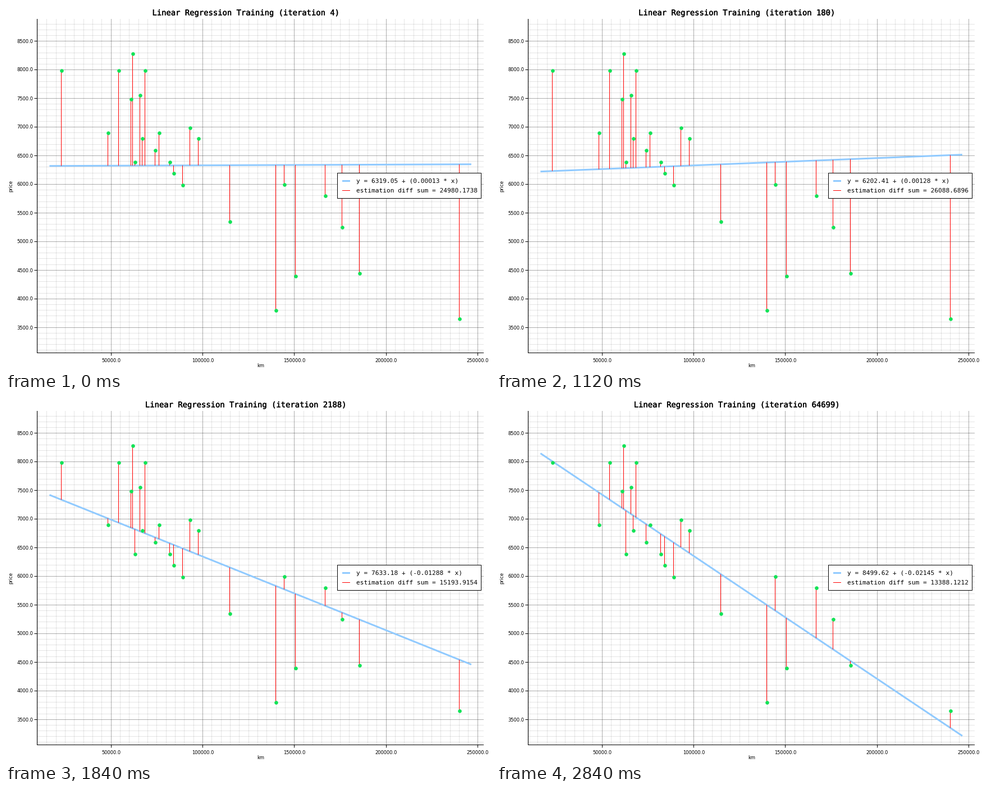
These frames come from a looping animation (864 by 648 pixels, 2880 ms). A matplotlib script:

```python
import math

import matplotlib
matplotlib.rcParams["toolbar"] = "None"
import matplotlib.pyplot as plt
import numpy as np
from matplotlib.animation import FuncAnimation
from matplotlib.collections import LineCollection
from matplotlib.patches import Rectangle
from matplotlib.patheffects import withStroke

W, H, DPI = 864, 648, 72
FRAMES, STEP_MS = 72, 40
RED, BLUE, GREEN = "#ff0000", "#90caff", "#12e356"
MONO, SANS = "DejaVu Sans Mono", "DejaVu Sans"
LEFT, RIGHT, TOP, BOTTOM = 55.5, 851, 23, 617.5

# The data set: one (km, price) pair for each car.
CARS = [(240000, 3650), (139800, 3800), (150500, 4400), (185530, 4450),
        (176000, 5250), (114800, 5350), (166800, 5800), (89000, 5990),
        (144500, 5999), (84000, 6200), (82029, 6390), (63060, 6390),
        (74000, 6600), (97500, 6800), (67000, 6800), (76025, 6900),
        (48235, 6900), (93000, 6990), (60949, 7490), (65674, 7555),
        (54000, 7990), (68500, 7990), (22899, 7990), (61789, 8290)]
KM, PRICE = np.array(CARS, float).T
KM_SPAN, PRICE_SPAN = np.ptp(KM), np.ptp(PRICE)
KM_PIVOT = 101067.22

# Gradient descent on min-max scaled data, starting from zero weights.
RATE = 0.01
u = (KM - KM.min()) / KM_SPAN
v = (PRICE - PRICE.min()) / PRICE_SPAN
A = np.column_stack([np.ones_like(u), u])
HESS = A.T @ A / len(u)
BEST = np.linalg.solve(HESS, A.T @ v / len(u))


def iteration(k):
    """Steady pace at first, then geometric growth."""
    grown = math.exp(1.489957 + 0.1350439 * k) - 0.8 - 0.51 * k
    return round(max(1.2 * k, grown))


def fit(n):
    decay = np.linalg.matrix_power(np.eye(2) - RATE * HESS, n)
    weights = BEST - decay @ BEST
    slope = weights[1] * PRICE_SPAN / KM_SPAN
    return PRICE.mean() - slope * KM_PIVOT, slope


def px(km):
    return 187.2 + (km - 50000) * 0.0032655


def py(price):
    return 62.7 + (8500 - price) * 0.1019


def mid(value):
    """Centre of the pixel that holds the value."""
    return np.floor(value) + 0.5


fig = plt.figure(figsize=(W / DPI, H / DPI), dpi=DPI, facecolor="white")
ax = fig.add_axes([0, 0, 1, 1])
ax.set_xlim(0, W)
ax.set_ylim(H, 0)
ax.axis("off")


def rule(x0, y0, x1, y1, color="black", width=1, z=1, alpha=1):
    ax.plot([x0, x1], [y0, y1], color=color, lw=width, zorder=z, alpha=alpha,
            solid_capstyle="butt", snap=False)


def label(x, y, text, size=8.4, font=SANS, **kw):
    kw.setdefault("va", "center_baseline")
    return ax.text(x, y, text, fontsize=size, family=font, zorder=6, **kw)


for km in range(10000, 253001, 5000):
    x, major = mid(px(km)), km % 50000 == 0
    rule(x, TOP, x, BOTTOM, alpha=0.32 if major else 0.1)
    if major:
        rule(x, BOTTOM, x, BOTTOM + 5)
        label(x, 630.5, f"{km:.1f}", ha="center")

for price in range(3100, 8801, 100):
    y, major = mid(py(price)), price % 500 == 0
    rule(LEFT, y, RIGHT, y, alpha=0.32 if major else 0.1)
    if major:
        rule(LEFT - 5, y, LEFT, y)
        label(48, y - 0.5, f"{price:.1f}", ha="right")

rule(LEFT, TOP, LEFT, BOTTOM + 0.5)
rule(LEFT, BOTTOM, RIGHT, BOTTOM)
label(454, 639.5, "km", ha="center")
label(9, 320, "price", ha="center", va="center", rotation=90)

line_km = np.array([KM.min() - 0.03 * KM_SPAN, KM.max() + 0.03 * KM_SPAN])
line, = ax.plot([], [], color=BLUE, lw=3, zorder=2, solid_capstyle="butt",
                snap=False)
stems = LineCollection([], colors=RED, linewidths=1, zorder=3, snap=False)
ax.add_collection(stems)
stem_x = mid(px(KM))
ax.plot(stem_x, mid(py(PRICE)), "o", color=GREEN, ms=6.6, mew=0, zorder=4,
        snap=False)

ax.add_patch(Rectangle((590.5, 297.5), 256, 45, fc="white", ec="black",
                       lw=1, zorder=5, snap=False))
rule(599, 311.5, 613, 311.5, BLUE, 3, 6)
rule(599, 328.5, 613, 328.5, RED, 1, 6)
title = label(428, 11, "", 13.85, MONO, ha="center",
              path_effects=[withStroke(linewidth=0.4, foreground="black")])
formula = label(624.5, 311, "", 11.1, MONO)
total = label(624.5, 328, "", 11.1, MONO)


def draw(k):
    n = iteration(k)
    base, slope = fit(n)
    guess = base + slope * KM
    line.set_data(px(line_km), py(base + slope * line_km))
    stems.set_segments([[(x, y), (x, g)] for x, y, g
                        in zip(stem_x, py(PRICE), py(guess))])
    title.set_text(f"Linear Regression Training (iteration {n})")
    formula.set_text(f"y = {base:.2f} + ({slope:.5f} * x)")
    total.set_text(f"estimation diff sum = {np.abs(PRICE - guess).sum():.4f}")
    return line, stems, title, formula, total


anim = FuncAnimation(fig, draw, frames=FRAMES, interval=STEP_MS, repeat=True,
                     repeat_delay=0, init_func=lambda: draw(0))
plt.show()
```
